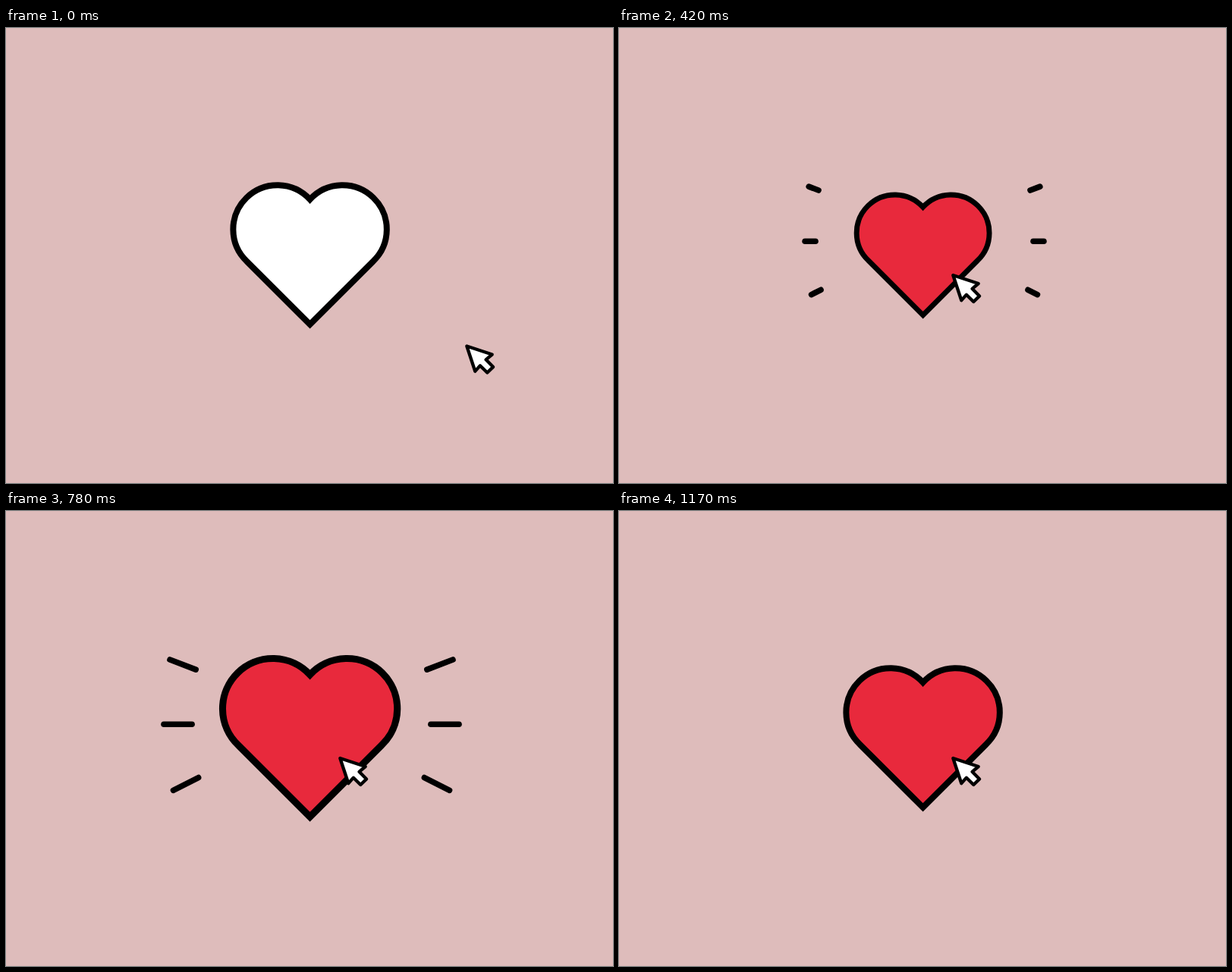
An HTML page for the animation above (1.29 s loop, 800 px wide and 600 px high).

```html
<!DOCTYPE html>
<html lang="en">
<head>
<meta charset="utf-8">
<title>Like</title>
<style>
  html, body { margin: 0; width: 100%; height: 100%; overflow: hidden; background: #debcbb; }
  svg { display: block; width: 100%; height: 100%; }
  .ray { stroke: #000; stroke-width: 7.6; stroke-linecap: round; }
</style>
</head>
<body>
<svg viewBox="0 0 800 600">
  <g id="rays"></g>
  <path id="heart" stroke="#000" stroke-width="8"
    d="M400.6 390.9 L317.5 307.8 A58.3 58.3 0 1 1 400.6 226.1 A58.3 58.3 0 1 1 483.7 307.8 Z"/>
  <path id="cursor" fill="#fff" stroke="#000" stroke-width="4.3" stroke-linejoin="round"
    d="M0 0 L33.4 11 L25.2 17.8 L34.8 27.4 L27 35 L17.6 25.7 L11 33.2 Z"/>
</svg>
<script>
const LOOP = 1290, STEP = 30;
const WHITE = [255, 255, 255], RED = [232, 41, 60];
const CENTER = [400.6, 300.4];
const MIRROR = 805;

// inner x, inner y, outer x, outer y of the left-hand rays
const LEFT = [
  [263, 214, 216, 196],
  [259, 281.2, 208, 281.2],
  [266, 345.3, 220.5, 368.3]
];
const RAYS = LEFT.concat(LEFT.map(([a, b, c, d]) => [MIRROR - a, b, MIRROR - c, d]));

const heart = document.getElementById('heart');
const cursor = document.getElementById('cursor');
const group = document.getElementById('rays');
const lines = RAYS.map(() => {
  const line = document.createElementNS('http://www.w3.org/2000/svg', 'line');
  line.setAttribute('class', 'ray');
  return group.appendChild(line);
});

const span = (t, a, b) => Math.min(1, Math.max(0, (t - a) / (b - a)));
const mix = (a, b, p) => a + (b - a) * p;
const smooth = p => p * p * (3 - 2 * p);

function heartScale(t) {
  if (t < 330) return mix(1, 0.8, smooth(span(t, 210, 330)));
  if (t < 690) return mix(0.8, 1.15, smooth(span(t, 330, 660)));
  return mix(1.15, 1, smooth(span(t, 715, 1080)));
}

function draw(t) {
  const move = span(t, 0, 210);
  cursor.setAttribute('transform',
    `translate(${mix(607.3, 440.3, move)} ${mix(419.5, 326, move)})`);

  const [cx, cy] = CENTER;
  heart.setAttribute('transform',
    `translate(${cx} ${cy}) scale(${heartScale(t)}) translate(${-cx} ${-cy})`);
  const tint = span(t, 210, 330);
  heart.setAttribute('fill', `rgb(${WHITE.map((w, i) => Math.round(mix(w, RED[i], tint)))})`);

  const head = Math.max(0.01, span(t, 330, 660));
  const tail = span(t, 690, 1020);
  group.style.display = t >= 330 && t < 1020 ? '' : 'none';
  RAYS.forEach(([x, y, u, v], i) => {
    const ends = { x1: mix(x, u, tail), y1: mix(y, v, tail), x2: mix(x, u, head), y2: mix(y, v, head) };
    for (const key in ends) lines[i].setAttribute(key, ends[key]);
  });
}

const start = performance.now();
function tick() {
  const t = (performance.now() - start) % LOOP;
  draw(Math.floor(t / STEP) * STEP);
  requestAnimationFrame(tick);
}
tick();
</script>
</body>
</html>
```
